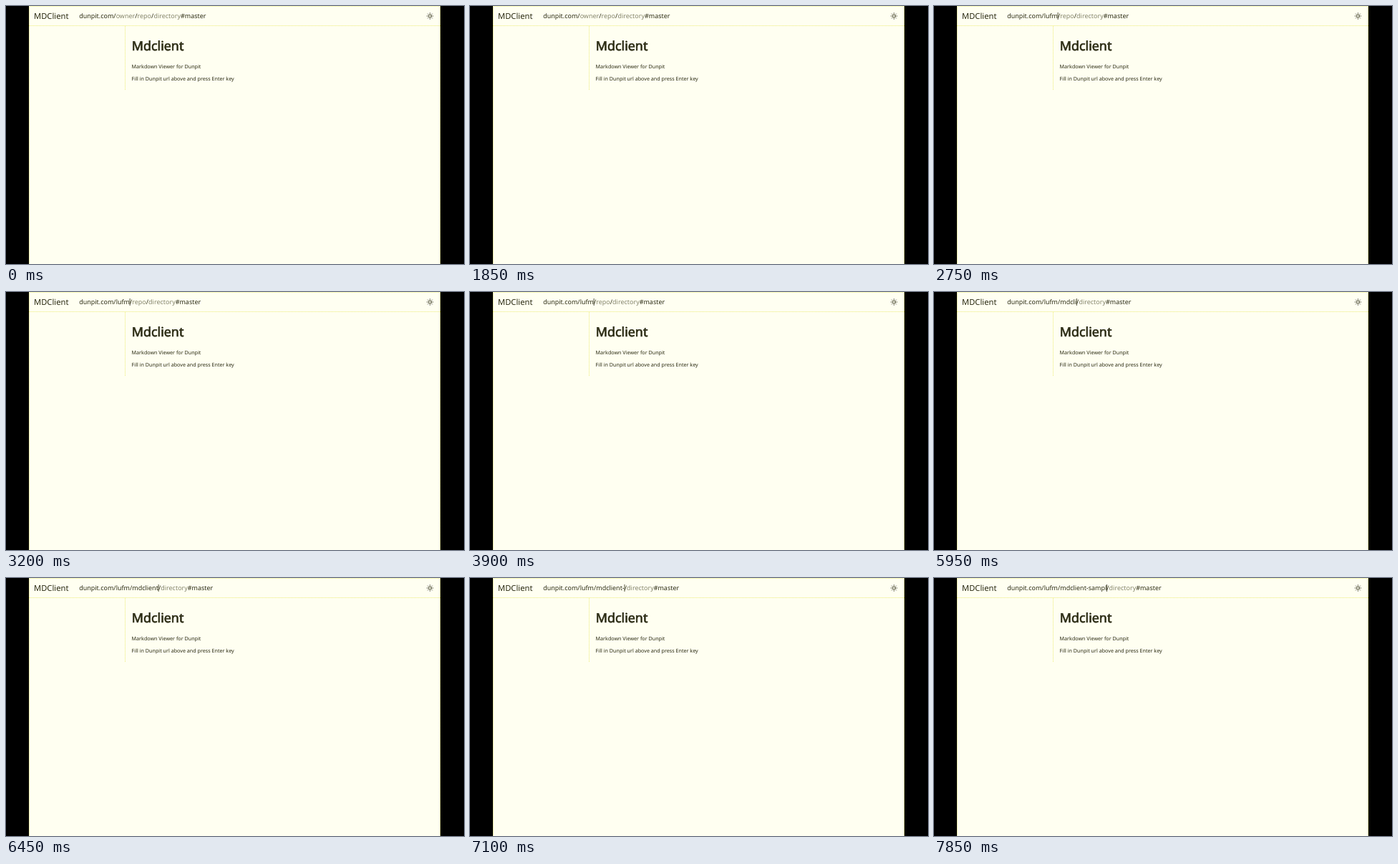
Write an HTML page that moves like this. It is 640 by 360 pixels and loops after 8000 ms.

```html
<!DOCTYPE html>
<html lang="en">
<head>
<meta charset="utf-8">
<title>MDClient</title>
<style>
  html, body { margin: 0; width: 100%; height: 100%; overflow: hidden; background: #000; }
  svg { display: block; width: 100%; height: 100%; }
  text { font-family: "Noto Sans", sans-serif; fill: #2b2b14; text-rendering: geometricPrecision; }
  .brand { font-size: 11.2px; }
  .url { font-size: 8.96px; }
  .title { font-size: 17.92px; stroke: #2b2b14; stroke-width: .65; }
  .body { font-size: 7.168px; }
  .hint { fill: #85856c; }
  .rule { stroke: #ecec78; stroke-dasharray: 1 1; fill: none; }
  .icon { stroke: #2b2b14; fill: none; stroke-width: .9; stroke-linecap: round; }
</style>
</head>
<body>
<svg viewBox="0 0 640 360">
  <rect width="640" height="360"/>
  <rect x="32" width="575" height="360" fill="#fffff1"/>
  <path class="rule" d="M32 .5H607M32 27.5H607M166.5 28V118M32.5 0V360M606.5 0V360"/>

  <text class="brand" x="39" y="18">MDClient</text>
  <text class="url" id="url" x="102.2" y="17.2"><tspan>dunpit.com/</tspan><tspan id="owner"></tspan><tspan>/</tspan><tspan id="repo"></tspan><tspan>/</tspan><tspan class="hint">directory</tspan><tspan>#master</tspan></text>
  <rect id="caret" y="9" width=".8" height="10" fill="#2b2b14"/>

  <g class="icon" transform="translate(592.5 14)">
    <circle r="2"/>
    <path id="rays"/>
  </g>

  <text class="title" x="175.7" y="62.4">Mdclient</text>
  <text class="body" x="175.6" y="86.6">Markdown Viewer for Dunpit</text>
  <text class="body" x="175.6" y="103.5">Fill in Dunpit url above and press Enter key</text>
</svg>
<script>
  const LOOP = 8000;
  const HOST = "dunpit.com/".length;
  const FOCUS_OWNER = 1900;
  const FOCUS_REPO = 5200;

  const $ = id => document.getElementById(id);
  const fields = {
    owner: { text: "lufm", hint: "owner", keys: [2000, 2250, 2450, 2650] },
    repo: {
      text: "mdclient-sampl", hint: "repo",
      keys: [5400, 5550, 5650, 5800, 5900, 6000, 6100, 6300, 7100, 7200, 7300, 7400, 7600, 7800]
    }
  };

  $("rays").setAttribute("d", Array.from({ length: 8 }, (_, i) => {
    const a = i * Math.PI / 4;
    const at = r => `${r * Math.cos(a)} ${r * Math.sin(a)}`;
    return `M${at(3.6)}L${at(4.2)}`;
  }).join(""));

  // Fills a field with the keys typed so far and returns their count and the shown length.
  function fill(id, t) {
    const { text, hint, keys } = fields[id];
    const typed = keys.filter(k => k <= t).length;
    const shown = typed ? text.slice(0, typed) : hint;
    const el = $(id);
    if (el.textContent !== shown) el.textContent = shown;
    el.setAttribute("class", typed ? "" : "hint");
    return { typed, length: shown.length };
  }

  function draw(t) {
    const owner = fill("owner", t);
    const repo = fill("repo", t);
    const before = t < FOCUS_REPO
      ? HOST + owner.typed
      : HOST + owner.length + 1 + repo.typed;
    const caret = $("caret");
    caret.setAttribute("visibility", t < FOCUS_OWNER ? "hidden" : "visible");
    caret.setAttribute("x", 102 + $("url").getSubStringLength(0, before));
  }

  const start = performance.now();
  function tick() {
    draw((performance.now() - start) % LOOP);
    requestAnimationFrame(tick);
  }
  tick();
</script>
</body>
</html>
```
